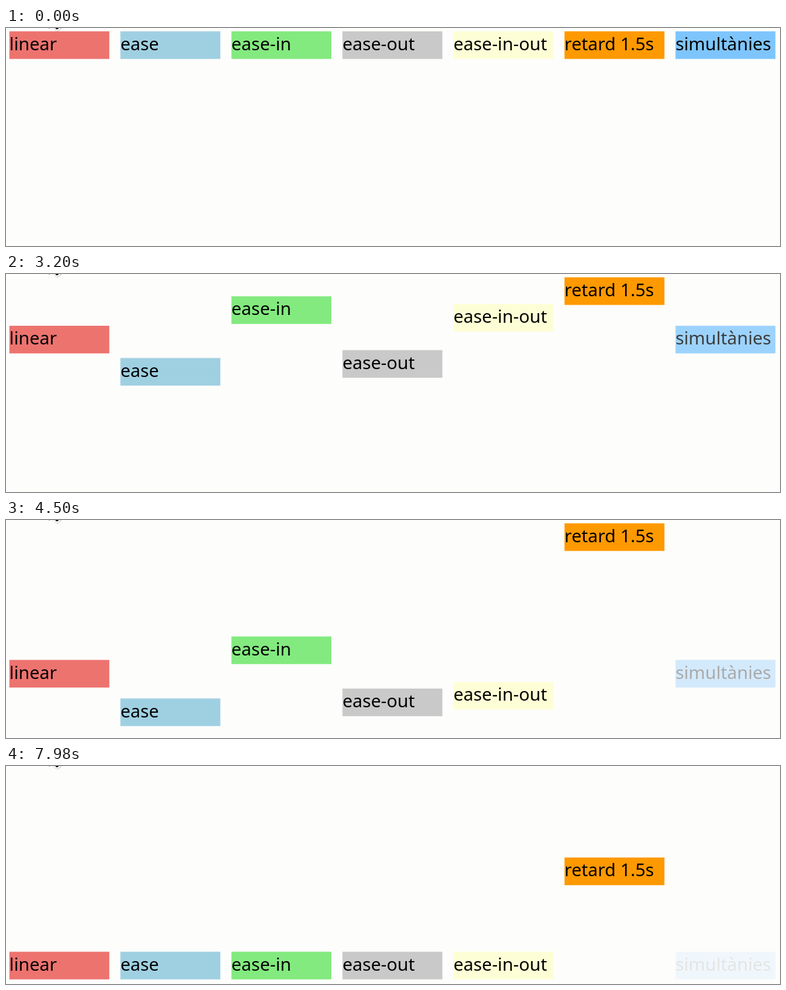
These frames come from a looping animation (1280 by 362 pixels, 8 s). An HTML page with a canvas:

```html
<!DOCTYPE html>
<html lang="ca">
<head>
<meta charset="utf-8">
<title>Transicions</title>
<style>
  html, body { margin: 0; width: 100%; height: 100%; overflow: hidden; background: #fdfdfc; }
  canvas { display: block; }
</style>
</head>
<body>
<canvas id="stage" width="1280" height="362"></canvas>
<script>
const ctx = document.getElementById('stage').getContext('2d');
const LOOP = 8000;
const PAPER = '#fdfdfc';
const UNIT = 1.836;
const LEFT = 5.6, TOP = 5.5, PITCH = 183.6;
const WIDTH = 90 * UNIT, HEIGHT = 25 * UNIT, TRAVEL = 165 * UNIT;
const FONT_SIZE = 16 * UNIT;

const clamp = v => Math.min(1, Math.max(0, v));

function bezier(x1, y1, x2, y2) {
  const at = (a, b, s) => 3 * a * s * (1 - s) ** 2 + 3 * b * s * s * (1 - s) + s ** 3;
  return x => {
    let lo = 0, hi = 1;
    for (let i = 0; i < 30; i++) {
      const mid = (lo + hi) / 2;
      if (at(x1, x2, mid) < x) lo = mid; else hi = mid;
    }
    return at(y1, y2, (lo + hi) / 2);
  };
}

const linear = x => x;
const main = { start: 53.07, length: 60 };
const delayed = { start: 141.95, length: 62.15 };

const boxes = [
  { label: 'linear', color: '#ed736f', ease: linear, span: main },
  { label: 'ease', color: '#9fd0e2', ease: bezier(.25, .1, .25, 1), span: main },
  { label: 'ease-in', color: '#83ea7f', ease: bezier(.42, 0, 1, 1), span: main },
  { label: 'ease-out', color: '#c9c9c9', ease: bezier(0, 0, .58, 1), span: main },
  { label: 'ease-in-out', color: '#fefed6', ease: bezier(.42, 0, .58, 1), span: main },
  { label: 'retard 1.5s', color: '#ff9900', ease: linear, span: delayed },
  { label: 'simultànies', color: '#7dc5fc', ease: linear, span: main, fade: .9 }
];

// Ticks come in threes, held for 20, 20 and 100 ms.
function tickAt(ms) {
  const shifted = ms + 20;
  const rest = shifted % 140;
  return 3 * Math.floor(shifted / 140) + (rest < 20 ? 0 : rest < 40 ? 1 : 2);
}

function drawBox(box, index, tick) {
  const p = clamp((tick - box.span.start) / box.span.length);
  const x = LEFT + index * PITCH;
  const y = TOP + TRAVEL * (p > 0 && p < 1 ? box.ease(p) : p);
  ctx.fillStyle = box.color;
  ctx.fillRect(x, y, WIDTH, HEIGHT);
  ctx.fillStyle = '#000';
  ctx.fillText(box.label, x, y + FONT_SIZE * 1.069);
  if (box.fade) {
    // Veil the finished box so that it fades as one group.
    ctx.globalAlpha = box.fade * p;
    ctx.fillStyle = PAPER;
    ctx.fillRect(x - 1, y - 1, WIDTH + 2, HEIGHT + 2);
    ctx.globalAlpha = 1;
  }
}

function polygon(color, ...points) {
  ctx.fillStyle = color;
  ctx.beginPath();
  points.forEach(([x, y]) => ctx.lineTo(x, y));
  ctx.fill();
}

function drawPointer() {
  polygon('#d2d2d2', [77, 0], [92, 0], [90, 3], [85, 6], [81, 4]);
  polygon('#ffffff', [78, 0], [90, 0], [88, 3], [84, 4.5], [81, 3]);
  polygon('#111111', [81, 0], [87.5, 0], [86, 1.8], [83.5, 2.2]);
  polygon('#999999', [70, 0], [74, 0], [71, 1]);
}

function draw(ms) {
  const tick = tickAt(ms % LOOP);
  ctx.fillStyle = PAPER;
  ctx.fillRect(0, 0, 1280, 362);
  ctx.font = `${FONT_SIZE}px "Noto Sans", sans-serif`;
  ctx.textBaseline = 'alphabetic';
  drawPointer();
  boxes.forEach((box, i) => drawBox(box, i, tick));
}

const began = performance.now();
function run() {
  draw(performance.now() - began);
  requestAnimationFrame(run);
}
run();
</script>
</body>
</html>
```
